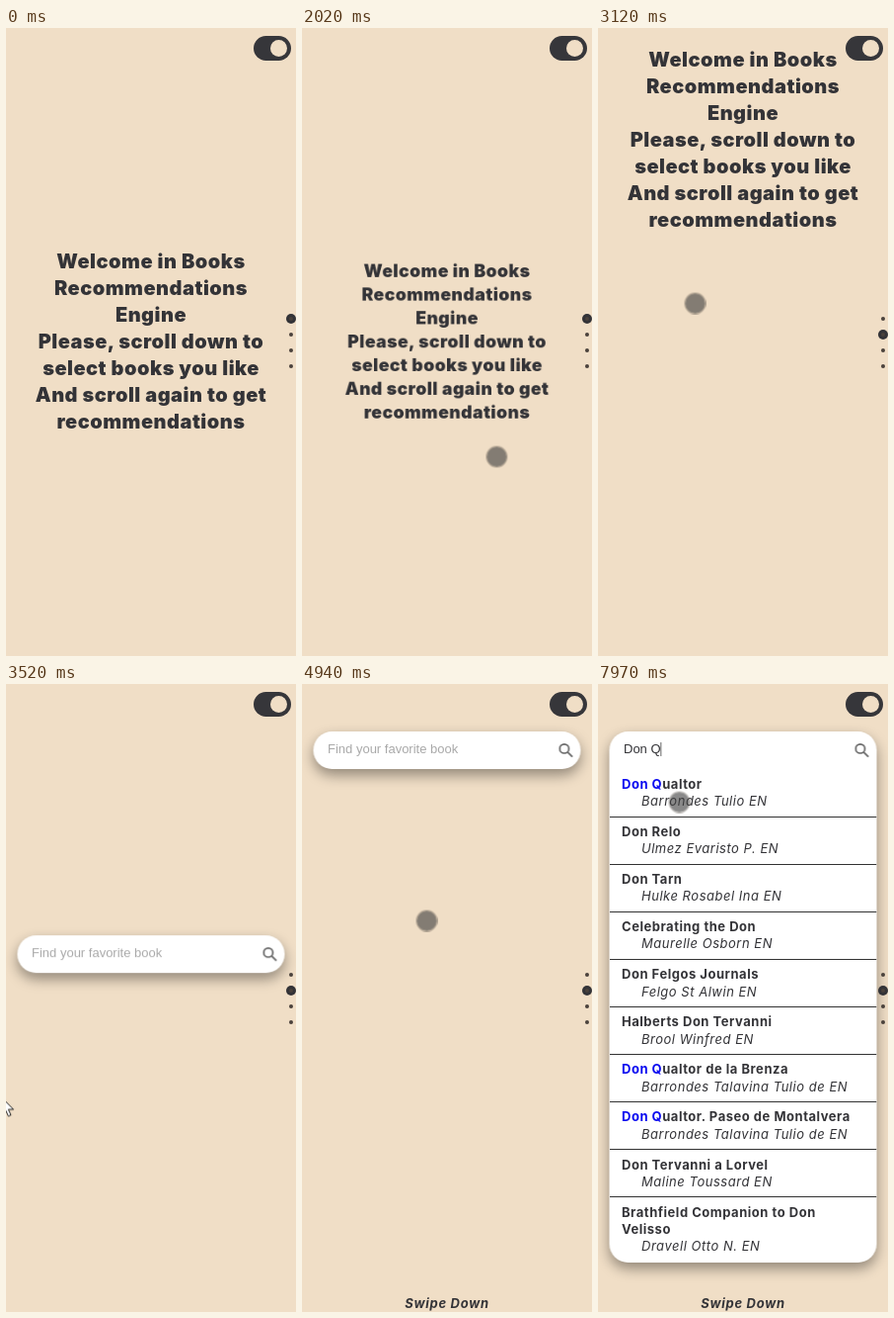
Animation of 294x635 px, one loop 8 s. Source, as an HTML page:

```html
<!DOCTYPE html>
<html lang="en">
<head>
<meta charset="utf-8">
<title>Book recommendations</title>
<style>
  html, body { margin: 0; width: 100%; height: 100%; overflow: hidden; background: #f0dec6; }
  #stage { position: relative; width: 294px; height: 635px; overflow: hidden; background: #f0dec6;
    color: #333337; font: 650 13px/17.4px Inter, Montserrat, sans-serif; letter-spacing: .04em; }
  #stage div, #stage svg { position: absolute; }
  #deck { inset: 0; }
  #welcome { left: 0; top: 222.5px; width: 294px; text-align: center; white-space: nowrap;
    font-size: 20px; font-weight: 900; line-height: 27px; letter-spacing: .025em; }
  #hint { left: 0; top: 1253px; width: 294px; text-align: center; font-weight: 700; font-style: italic;
    letter-spacing: .055em; }
  #panel { left: 12px; top: 856px; width: 271px; height: 38px; border-radius: 19px; overflow: hidden;
    background: #fff; box-shadow: 0 6px 14px rgba(0, 0, 0, .4); }
  #panel .field { left: 14.5px; top: 11px; height: 14px; white-space: pre; letter-spacing: 0;
    font: 13px/14px "Liberation Sans", Arial, sans-serif; }
  .typed { border-right: 1px solid #333; }
  #placeholder { color: #a9a9a9; }
  #caret { left: 14px; top: 12px; width: 1px; height: 14px; background: #333; }
  #lens { left: 247.5px; top: 11px; }
  .list { left: 0; top: 38.6px; width: 271px; white-space: nowrap; }
  .list p { margin: 0; padding: 6.2px 0 6.1px 12.5px; border-bottom: 1px solid #333; }
  .list p:last-child { border-color: transparent; }
  .list i { display: block; padding-left: 20px; font-weight: 400; }
  .list b { font-weight: inherit; color: #0a0af0; }
  #bar { left: 265px; top: 41px; width: 2px; height: 459px; background: #a9a9b4; }
  #toggle { left: 251px; top: 8px; width: 38px; height: 25px; border-radius: 13px; background: #36363a; }
  #toggle div { left: 17px; top: 4px; width: 17px; height: 17px; border-radius: 50%; background: #f0dec6; }
  .dot { left: 287px; width: 4px; height: 4px; border-radius: 50%; background: #4a423c; }
  #active { left: 284px; top: 289px; width: 10px; height: 10px; border-radius: 50%; background: #333337; }
  #touch { left: -11.5px; top: -11.5px; width: 20px; height: 20px; border-radius: 50%;
    border: 1.5px solid rgba(90, 82, 74, .42); background: rgba(66, 66, 66, .62); background-clip: padding-box; }
  #arrow { left: 0; top: 0; overflow: visible; }
</style>
</head>
<body>
<div id="stage">
  <div id="deck">
    <div id="welcome">Welcome in Books<br>Recommendations<br>Engine<br>Please, scroll down to<br>select books you like<br>And scroll again to get<br>recommendations</div>
    <div id="panel">
      <div id="placeholder" class="field">Find your favorite book</div>
      <div id="caret"></div>
      <svg id="lens" width="16" height="16" fill="none" stroke="#666" stroke-width="1.7">
        <circle cx="6.4" cy="6.4" r="4.6"/><path d="M9.8 9.8L14.6 14.6"/>
      </svg>
      <div id="bar"></div>
    </div>
    <div id="hint">Swipe Down</div>
  </div>
  <div id="toggle"><div></div></div>
  <div id="active"></div>
  <div id="touch"></div>
  <svg id="arrow" width="14" height="22" fill="#fff" stroke="#222"><path d="M0 0V16L3.7 12.6 6.4 18.6 9 17.4 6.4 11.8H11.6Z"/></svg>
</div>
<script>
const LOOP = 8000;
const $ = id => document.getElementById(id);
const t0 = performance.now();

// steps: [ms, properties, easing towards the next step]
function play(el, steps) {
  const frames = steps.map(([ms, props, easing = 'linear']) => ({ ...props, easing, offset: ms / LOOP }));
  if (frames[0].offset > 0) frames.unshift({ ...frames[0], offset: 0, easing: 'linear' });
  if (frames.at(-1).offset < 1) frames.push({ ...frames.at(-1), offset: 1 });
  el.animate(frames, { duration: LOOP, iterations: Infinity }).startTime = t0;
}
const hold = (el, prop, steps) =>
  play(el, steps.map(([ms, value]) => [ms, { [prop]: value }, 'step-end']));
// times alternate between shown and hidden
const show = (el, ...times) =>
  hold(el, 'opacity', [[0, 0], ...times.map((ms, i) => [ms, 1 - i % 2])]);
const at = (x, y) => ({ transform: `translate(${x}px, ${y}px)` });

function add(parent, cls, html) {
  const el = document.createElement('div');
  el.className = cls;
  el.innerHTML = html;
  parent.append(el);
  return el;
}

// "|" marks a line break in a title
const wide = [
  ['Dorums Elaborate Ledger', 'Dorum Ekkel'],
  ['Celia Dovars Simply Delightful 9-|Block', 'Dovar Celia'],
  ['Yours Fondly, Emil Dorbs', 'Dorbs Emil'],
  ['What Doesnt Bend Oak', 'Crast Donla'],
  ['Chronicle of the Days of Bertrand|Dovelass, an Alpine Shepherd', 'Dovelass Bertrand'],
  ['Lem Dorge Talks About Maple', 'Dorge Lem'],
  ['Essential Dovina Marlow Collection', 'Marlow Dovina'],
  ['Zadania i wskazowki.|Wprowadzenie do Krajowego|Konkursu Ogrodniczego. Tom 3', 'Dorzawka Olek'],
  ['Donla Windmeres Essential Guide|to Garden and Riverside Sketching', 'Windmere Donla']
];
const narrow = [
  ['Don Qualtor', 'Barrondes Tulio'],
  ['Don Relo', 'Ulmez Evaristo P.'],
  ['Don Tarn', 'Hulke Rosabel Ina'],
  ['Celebrating the Don', 'Maurelle Osborn'],
  ['Don Felgos Journals', 'Felgo St Alwin'],
  ['Halberts Don Tervanni', 'Brool Winfred'],
  ['Don Qualtor de la Brenza', 'Barrondes Talavina Tulio de'],
  ['Don Qualtor. Paseo de Montalvera', 'Barrondes Talavina Tulio de'],
  ['Don Tervanni a Lorvel', 'Maline Toussard'],
  ['Brathfield Companion to Don|Velisso', 'Dravell Otto N.']
];
const pick = (books, ...ids) => ids.map(i => books[i]);
const first = [...pick(wide, 0, 2, 3, 5), ...pick(narrow, 1, 2), wide[6], narrow[9], ...pick(narrow, 4, 8)];
const middle = [narrow[3], wide[8], ...pick(narrow, 5, 1, 9, 2, 8), wide[3], ...pick(narrow, 4, 0)];

function addList(books, query, from, to) {
  const mark = s => s.replace(new RegExp(query, 'gi'), '<b>$&</b>').replace(/\|/g, '<br>');
  const rows = books.map(([title, author]) => `<p>${mark(title)}<i>${mark(author)} EN</i></p>`);
  show(add($('panel'), 'list', rows.join('')), from, to);
}
[
  [first, 'D', 5610, 5790],
  [first, 'Do', 5790, 5850],
  [wide, 'Do', 5850, 5990],
  [wide, 'Don', 5990, 6070],
  [middle, 'Don', 6070, 6230],
  [middle, 'Don ', 6230, 6480],
  [narrow, 'Don ', 6480, 6610],
  [narrow, 'Don Q', 6610, LOOP]
].forEach(args => addList(...args));
$('panel').append($('bar'));
show($('bar'), 5850, 6480);

const keys = [['D', 5370], ['Do', 5790], ['Don', 5990], ['Don ', 6230], ['Don Q', 6610]];
keys.forEach(([text, from], i) => {
  const el = add($('panel'), 'field typed', text);
  show(el, from, i < 4 ? keys[i + 1][1] : LOOP);
  if (i === 4) hold(el, 'borderRightColor', [[0, '#333'], [7120, 'transparent'], [7630, '#333']]);
});
show($('caret'), 4430, 4940);
hold($('placeholder'), 'opacity', [[0, 1], [5370, 0]]);

for (let i = 0; i < 4; i++) add($('stage'), 'dot', '').style.top = 292 + i * 16 + 'px';
hold($('active'), 'transform', [[0, 'none'], [3060, 'translateY(16px)']]);

play($('welcome'), [
  [1310, { transform: 'scale(1)' }, 'ease-in-out'],
  [2095, { transform: 'scale(.88)' }, 'ease-in-out'],
  [2880, { transform: 'scale(1)' }]
]);
play($('deck'), [
  [2950, at(0, 0), 'ease-in'],
  [3121, at(0, -204), 'cubic-bezier(.23, 1, .32, 1)'],
  [4130, at(0, -635)]
]);
// the panel is centred, so it sits on half a pixel
play($('panel'), [
  [4279, at(-.5, 0), 'cubic-bezier(.5, 0, .5, 1.4)'],
  [4770, at(-.5, -173)]
]);
hold($('panel'), 'height', [[0, '38px'], [5610, '537px'], [5850, '552px'], [6480, '537px']]);

play($('touch'), [
  [1480, at(306, 500), 'ease-out'],
  [2020, at(197.5, 433.5)],
  [2110, at(190, 434), 'ease-in-out'],
  [2870, at(98, 540)],
  [2940, at(98, 540), 'ease-in'],
  [3121, at(98.5, 278.5)],
  [3180, at(85, 215)],
  [3350, at(8, 350)],
  [3620, at(14, 420)],
  [3800, at(60, 340), 'ease-out'],
  [4100, at(126.5, 239.5)],
  [7630, at(126.5, 239.5), 'ease-in-out'],
  [7970, at(82.5, 119.5)]
]);
show($('touch'), 1480, 3350, 3620);
play($('arrow'), [[3400, at(-9, 398)], [3520, at(-4, 418.5)], [3620, at(2, 412)]]);
show($('arrow'), 3400, 3620);
</script>
</body>
</html>
```
